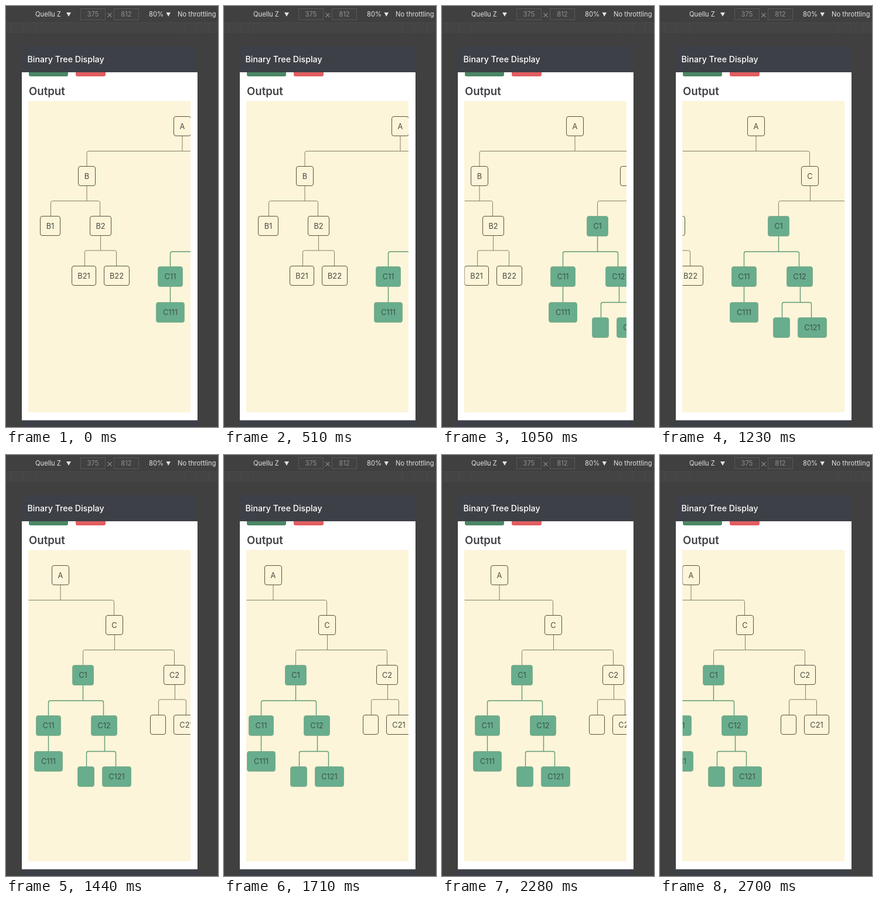
Write an HTML page that moves like this. It is 362 by 718 pixels and loops after 2730 ms.

```html
<!DOCTYPE html>
<html lang="en">
<head>
<meta charset="utf-8">
<title>Binary Tree Display</title>
<style>
  html, body { margin: 0; width: 100%; height: 100%; overflow: hidden; background: #404040; }
  svg { display: block; width: 362px; height: 718px; font-family: Inter, sans-serif; }
  .tool { font-size: 11.2px; fill: #e2e2e2; }
  .field { fill: #414141; stroke: #585858; }
  .dim { fill: #8f8f8f; }
  .tick { stroke: #4a4a4a; fill: none; }
  .link { fill: none; stroke: #7b725b; stroke-width: .9; }
  .link.green { stroke: #5f9b76; stroke-width: 1.4; }
  .node rect { fill: none; stroke: #5b523f; }
  .node.green rect { fill: #68ad8d; stroke: #86ae8c; }
  .node text { font-size: 12.8px; text-anchor: middle; fill: #4b4a42; }
  .node.green text { fill: #3d5349; }
</style>
</head>
<body>
<svg viewBox="0 0 362 718">
  <clipPath id="view"><rect x="38.5" y="162" width="276.5" height="531"/></clipPath>

  <rect width="362" height="718" fill="#404040"/>
  <rect y="28" width="362" height="18" fill="#444"/>
  <path class="tick" d="M0 28.5H362M8.5 29v17M28.5 29v17M50.5 29v17M304.5 29v17M325.5 29v17M346.5 29v17"/>
  <g class="tool">
    <text x="50" y="18">Quellu Z</text>
    <path d="M103 11h8l-4 7z"/>
    <rect class="field" x="127.5" y="4.5" width="42" height="19"/>
    <rect class="field" x="184.5" y="4.5" width="42" height="19"/>
    <text class="dim" x="148.5" y="18" text-anchor="middle">375</text>
    <text class="dim" x="205.5" y="18" text-anchor="middle">812</text>
    <path d="M173.5 12l7 7m0-7l-7 7" stroke="#b5b5b5"/>
    <text x="244" y="18">80%</text>
    <path d="M273.500 11h7.500l-3.750 7z"/>
    <text x="293" y="18">No throttling</text>
  </g>

  <rect x="27" y="68" width="300" height="650" fill="#3d4046"/>
  <rect x="27" y="113" width="300" height="593.500" fill="#fff"/>
  <text x="36.500" y="96" font-size="14.200" font-weight="500" fill="#fff">Binary Tree Display</text>
  <path d="M39 113h67v4q0 3-3 3H42q-3 0-3-3z" fill="#4b8765"/>
  <path d="M119 113h51v4q0 3-3 3h-45q-3 0-3-3z" fill="#e15d60"/>
  <text x="39" y="152" font-size="18.600" font-weight="600" fill="#404045">Output</text>
  <rect x="38" y="162" width="277" height="531" fill="#fcf5d9"/>
  <g clip-path="url(#view)"><g id="tree"></g></g>
</svg>
<script>
const tree = document.getElementById("tree");
const LOOP = 2730, STEP = 30;

function add(parent, tag, attrs, text = "") {
  const el = document.createElementNS("http://www.w3.org/2000/svg", tag);
  for (const name in attrs) el.setAttribute(name, attrs[name]);
  el.textContent = text;
  return parent.appendChild(el);
}

function node(label, x, y, width, green = false) {
  const height = green ? 34 : 33;
  const g = add(tree, "g", { class: green ? "node green" : "node" });
  add(g, "rect", { x: x + .5, y: y + .5, width: width - 1, height, rx: 3.5 });
  add(g, "text", { x: x + width / 2, y: y + height / 2 + 5.2 }, label);
}

// A stem down from a parent, then a rounded bar dropping to two children.
function fork(x, top, bar, left, right, bottom, green = false) {
  add(tree, "path", {
    class: green ? "link green" : "link",
    d: `M${x} ${top}V${bar}M${left} ${bottom}V${bar + 3}q0-3 3-3H${right - 3}q3 0 3 3V${bottom}`
  });
}

fork(301, 222, 247.5, 138, 392.5, 273);
fork(138, 307, 332.5, 76.5, 160.5, 358);
fork(161.5, 392, 417, 134.5, 188.5, 443);
fork(393.5, 307, 332.5, 339.5, 495.5, 358);
fork(496.5, 392, 417, 468.5, 515.5, 443);
fork(339.5, 393, 419, 280.5, 374.5, 444, true);
fork(376.5, 479, 505.5, 345.5, 395.5, 531, true);
add(tree, "path", { class: "link green", d: "M280.5 479V505" });

node("A", 286, 188, 30);
node("B", 123, 273, 30);
node("B1", 58, 358, 35);
node("B2", 143, 358, 37);
node("B21", 112, 443, 42);
node("B22", 167, 443, 44);
node("C", 378, 273, 30);
node("C1", 321, 358, 37, true);
node("C11", 259, 444, 43, true);
node("C111", 256, 505, 49, true);
node("C12", 353, 444, 45, true);
node("", 330, 531, 29, true);
node("C121", 372, 531, 50, true);
node("C2", 477, 358, 37);
node("", 454, 443, 27);
node("C21", 494, 443, 43);

// Scroll path: time in ms, offset in px, speed in px/ms.
const path = [
  [750, 0, 0], [1050, 74, .34], [1440, 208, .31], [1590, 248, 0],
  [1710, 217, -.6], [2025, 0, 0], [2040, 0, 0], [2370, 248, 0]
];

function scrollAt(t) {
  const i = path.findIndex(p => p[0] > t);
  if (i === 0) return 0;
  if (i < 0) return path[path.length - 1][1];
  const [t0, x0, v0] = path[i - 1], [t1, x1, v1] = path[i];
  const d = t1 - t0, u = (t - t0) / d, w = 1 - u;
  return w * w * ((1 + 2 * u) * x0 + u * d * v0) + u * u * ((3 - 2 * u) * x1 - w * d * v1);
}

function draw() {
  const t = Math.floor(performance.now() % LOOP / STEP) * STEP;
  tree.setAttribute("transform", `translate(${-Math.round(scrollAt(t))} 0)`);
  requestAnimationFrame(draw);
}
draw();
</script>
</body>
</html>
```
